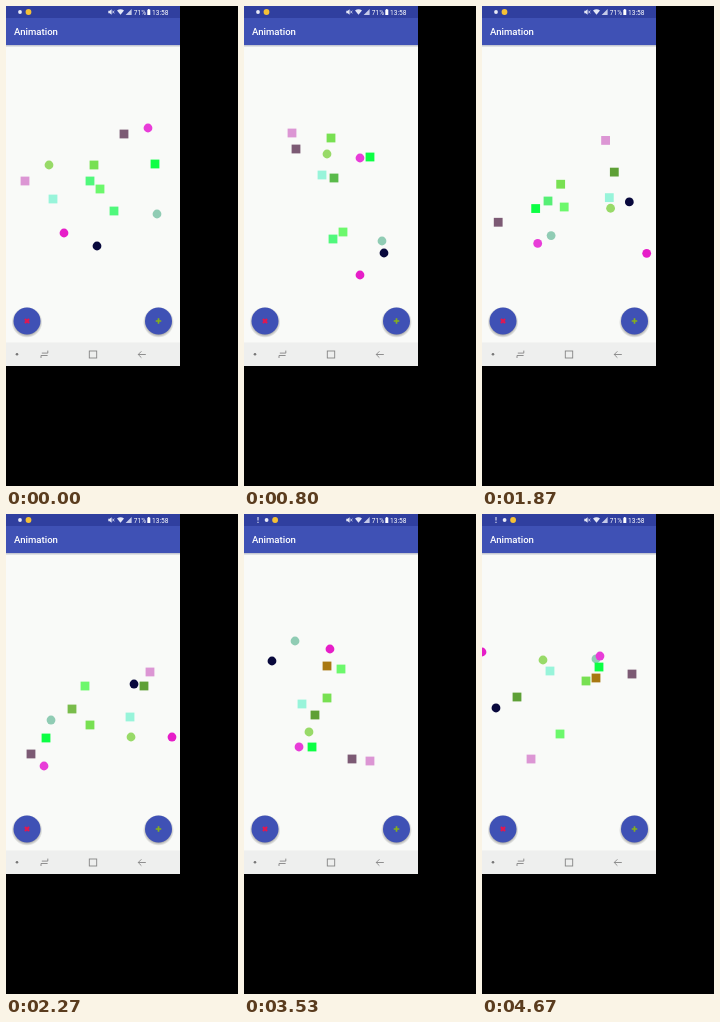
An HTML page that plays this animation: 232 by 480 pixels, repeating every 4.74 s.

```html
<!DOCTYPE html>
<html lang="en">
<head>
<meta charset="utf-8">
<title>Animation</title>
<style>
  html, body { margin: 0; width: 100%; height: 100%; overflow: hidden; background: #000; }
  svg { display: block; width: 232px; height: 480px; }
  text { font-family: Roboto, sans-serif; fill: #fff; }
  .line { fill: none; stroke: #858585; stroke-width: .9; }
</style>
</head>
<body>
<svg viewBox="0 0 232 480">
  <defs>
    <clipPath id="screen"><rect width="174" height="360"/></clipPath>
    <linearGradient id="fade" x2="0" y2="1">
      <stop stop-color="#8c92a8" stop-opacity=".6"/>
      <stop offset="1" stop-color="#8c92a8" stop-opacity="0"/>
    </linearGradient>
    <radialGradient id="shade">
      <stop offset=".78" stop-color="#555" stop-opacity=".5"/>
      <stop offset="1" stop-color="#555" stop-opacity="0"/>
    </radialGradient>
  </defs>
  <rect width="232" height="480"/>
  <g clip-path="url(#screen)">
    <rect width="174" height="360" fill="#f9faf8"/>
    <g id="shapes"></g>
    <rect width="174" height="39" fill="#3f51b5"/>
    <rect width="174" height="12" fill="#303f9f"/>
    <rect y="39" width="174" height="2.5" fill="url(#fade)"/>
    <text x="8" y="29.2" font-size="9.6" font-weight="500">Animation</text>

    <!-- status bar -->
    <path id="alert" d="M14 3v3.6M14 7.8v1.2" stroke="#dfe2f2" stroke-width="1.1"/>
    <g id="notes">
      <circle cx="14" cy="6" r="1.9" fill="#e8eaf6"/>
      <circle cx="22.5" cy="6" r="2.9" fill="#f5c136"/>
    </g>
    <path d="M102.3 4.8h1.4l1.9-1.6v5.6l-1.9-1.6h-1.4zM111 4.6q3.5-2.6 7 0l-3.5 4.2z" fill="#e4e7f6"/>
    <path d="M106.3 4.6l2 2.8m0-2.8l-2 2.8" stroke="#e4e7f6" stroke-width=".7"/>
    <path d="M125.6 3v6h-6z" fill="#c5cae9"/>
    <text x="127.8" y="8.5" font-size="6.6">71%</text>
    <path d="M141.3 3.7h.8v-.8h1.4v.8h.8v5.3h-3z" fill="#fff"/>
    <text x="146" y="8.5" font-size="6.6">13:58</text>

    <!-- round buttons -->
    <circle cx="21" cy="316.3" r="15.5" fill="url(#shade)"/>
    <circle cx="21" cy="315" r="13.5" fill="#3f51b5"/>
    <path d="M18.9 312.9l4.2 4.2m0-4.2l-4.2 4.2" stroke="#e3174f" stroke-width="2.1"/>
    <circle cx="152.5" cy="316.3" r="15.5" fill="url(#shade)"/>
    <circle cx="152.5" cy="315" r="13.5" fill="#3f51b5"/>
    <path d="M149.7 315h5.6m-2.8-2.8v5.6" stroke="#86b01c" stroke-width="1.7"/>

    <!-- navigation bar -->
    <rect y="336.5" width="174" height="23.5" fill="#eeefee"/>
    <circle cx="11" cy="348.3" r="1.3" fill="#777"/>
    <path class="line" d="M41.8 344.6v2.5h-6M35 352v-2.5h6.6"/>
    <rect class="line" x="83.3" y="345" width="7.4" height="7"/>
    <path class="line" d="M139.8 348.5h-7.6m3.2-3.2l-3.2 3.2 3.2 3.2"/>
  </g>
</svg>
<script>
const LOOP = 4740, STEP = 1000 / 15, LAST = 70;
const CENTER = [86, 187], PULL = 81, SIZE = 8.8;
const KEYS = [0, .8, 2.267, 3.533, 4.667];

// Waypoints are x, y at each key time. A pausing shape rests one second and changes colour.
const shapes = [
  { color: [152, 218, 104], round: true, at: [43,159, 83,148, 125,223, 65,218, 61,146] },
  { color: [144, 204, 180], round: true, at: [151,208, 138,235, 45,206, 51,127, 114,145] },
  { color: [230, 30, 200], round: true, at: [58,227, 116,269, 166,223, 86,135, 0,138] },
  { color: [8, 8, 60], round: true, at: [91,240, 140,247, 128,170, 28,147, 14,194] },
  { color: [220, 150, 212], at: [19,175, 48,127, 144,158, 126,247, 49,245] },
  { color: [124, 90, 116], at: [118,128, 52,143, 25,240, 108,245, 150,160] },
  { color: [152, 244, 218], at: [47,193, 78,169, 124,203, 58,190, 68,157] },
  { color: [120, 224, 82], at: [88,159, 87,132, 84,211, 83,184, 104,167] },
  { color: [108, 248, 108], at: [94,183, 99,226, 79,172, 97,155, 78,220] },
  { color: [80, 248, 124], to: [94, 160, 54], pause: .1, at: [84,175, 90,172, 138,172, 71,201, 35,183] },
  { color: [80, 248, 124], to: [168, 120, 18], pause: 1.8, at: [108,205, 89,233, 66,195, 83,152, 114,164] },
  { color: [12, 255, 68], at: [149,158, 126,151, 40,224, 68,233, 117,153] },
  { color: [232, 60, 216], round: true, at: [142,122, 116,152, 38,252, 55,233, 118,142] }
];

const clamp = (v, lo, hi) => Math.min(hi, Math.max(lo, v));
const rest = (s, t) => s.to ? clamp(t - s.pause, 0, 1) : 0;
const clock = (s, t) => t - rest(s, t);

// Flight under a pull of constant strength towards the centre.
function fly(p, v, time) {
  let x = p[0] - CENTER[0], y = p[1] - CENTER[1], [vx, vy] = v;
  const n = Math.ceil(time * 120), h = time / n;
  for (let i = 0; i < n; i++) {
    x += vx * h / 2;
    y += vy * h / 2;
    const k = PULL * h / Math.hypot(x, y, 2);
    vx -= x * k;
    vy -= y * k;
    x += vx * h / 2;
    y += vy * h / 2;
  }
  return { x: x + CENTER[0], y: y + CENTER[1], v: [vx, vy] };
}

// Newton search for the launch velocity that carries p to q.
function aim(p, q, time, guess) {
  const miss = v => {
    const e = fly(p, v, time);
    return [q[0] - e.x, q[1] - e.y];
  };
  let v = guess, best = null;
  for (let i = 0; i < 16; i++) {
    const m = miss(v), far = Math.hypot(...m);
    if (!best || far < best.far) best = { v, miss: m, far };
    const mx = miss([v[0] + .5, v[1]]), my = miss([v[0], v[1] + .5]);
    const a = 2 * (m[0] - mx[0]), b = 2 * (m[0] - my[0]);
    const c = 2 * (m[1] - mx[1]), d = 2 * (m[1] - my[1]);
    const det = a * d - b * c || 1e-6;
    v = [
      v[0] + clamp((m[0] * d - m[1] * b) / det, -15, 15),
      v[1] + clamp((m[1] * a - m[0] * c) / det, -15, 15)
    ];
  }
  return best;
}

function plan(s) {
  const point = i => s.at.slice(2 * i, 2 * i + 2);
  let guess;
  return KEYS.slice(1).map((key, i) => {
    const start = clock(s, KEYS[i]), time = clock(s, key) - start;
    const p = point(i), q = point(i + 1);
    guess = guess || [(q[0] - p[0]) / time, (q[1] - p[1]) / time];
    const leg = { start, time, p, ...aim(p, q, time, guess) };
    guess = fly(p, leg.v, time).v;
    return leg;
  });
}

function place(s, t) {
  const u = clock(s, t);
  const leg = s.legs.filter(l => l.start <= u).pop();
  const dt = u - leg.start, f = dt / leg.time;
  if (dt < 1e-6) return leg.p;
  const e = fly(leg.p, leg.v, dt);
  return [e.x + leg.miss[0] * f, e.y + leg.miss[1] * f];
}

const layer = document.getElementById('shapes');
for (const s of shapes) {
  s.legs = plan(s);
  s.el = document.createElementNS('http://www.w3.org/2000/svg', 'rect');
  const attrs = { x: -SIZE / 2, y: -SIZE / 2, width: SIZE, height: SIZE, rx: s.round ? SIZE / 2 : 0 };
  for (const name in attrs) s.el.setAttribute(name, attrs[name]);
  layer.append(s.el);
}

const notes = document.getElementById('notes');
const alertIcon = document.getElementById('alert');

function draw(t) {
  for (const s of shapes) {
    const [x, y] = place(s, t), mix = rest(s, t);
    const rgb = s.color.map((c, i) => s.to ? Math.round(c + (s.to[i] - c) * mix) : c);
    s.el.setAttribute('transform', `translate(${x.toFixed(2)} ${y.toFixed(2)})`);
    s.el.setAttribute('fill', `rgb(${rgb})`);
  }
  notes.setAttribute('transform', `translate(${8.6 * clamp((t - 2.4) / .2, 0, 1)} 0)`);
  alertIcon.setAttribute('opacity', clamp((t - 2.5) / .9, 0, 1));
}

function tick() {
  const now = performance.now() % LOOP;
  draw(Math.min(LAST, Math.floor((now + 4) / STEP)) * STEP / 1000);
  requestAnimationFrame(tick);
}
tick();
</script>
</body>
</html>
```
